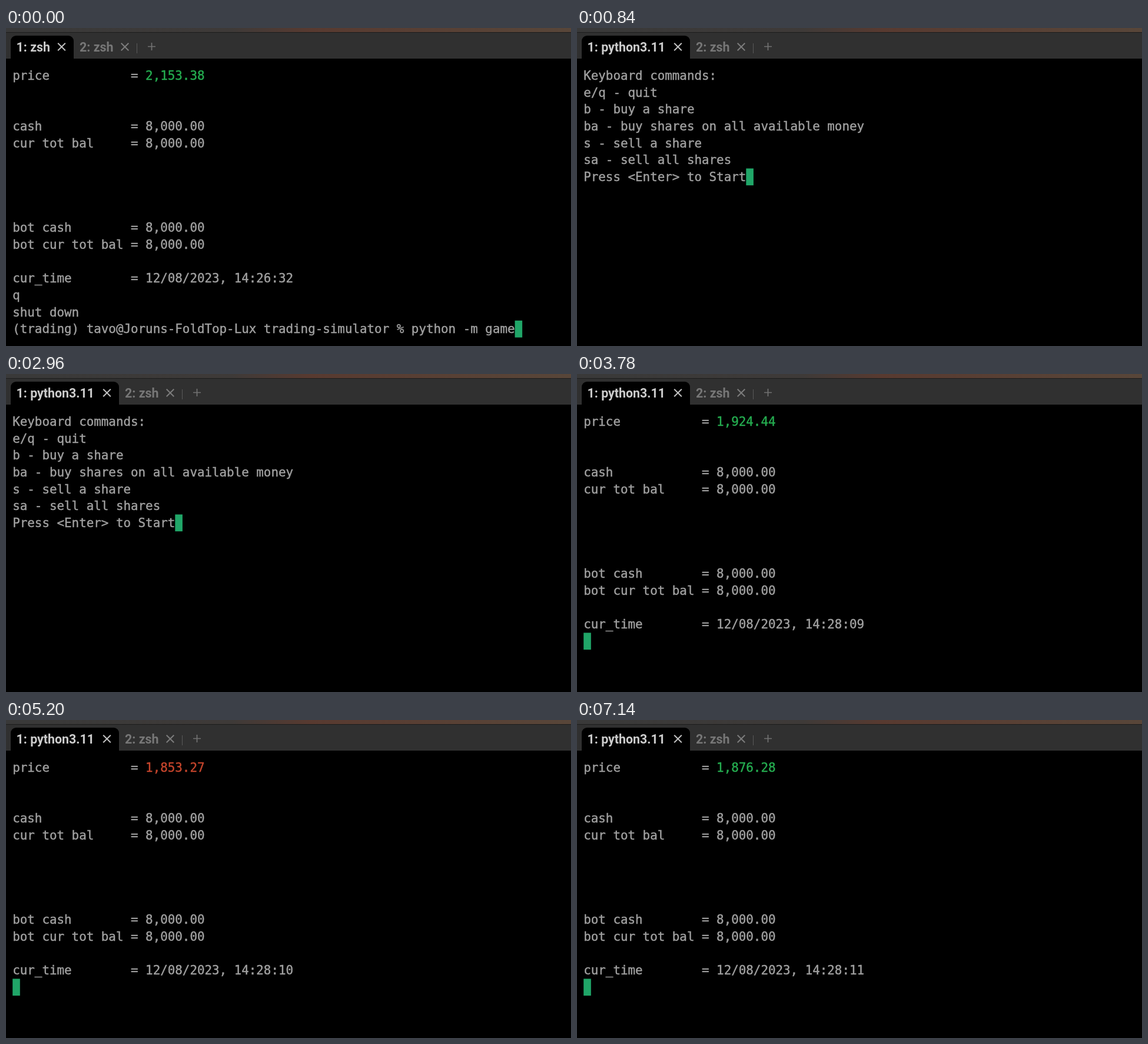
Animation, 960 px wide and 540 px high, one loop 8 s. Source, as an HTML page with a canvas:

```html
<!DOCTYPE html>
<html lang="en">
<head>
<meta charset="utf-8">
<title>Trading simulator terminal</title>
<style>
  html, body { margin: 0; width: 100%; height: 100%; overflow: hidden; background: #000; }
  canvas { display: block; width: 960px; height: 540px; }
</style>
</head>
<body>
<canvas id="stage" width="960" height="540"></canvas>
<script>
const ctx = document.getElementById('stage').getContext('2d');
const LOOP = 8000;
const LEFT = 11.2, COLUMN = 12.55, BASELINE = 87.8, ROW = 28.7;
const TEXT = '#a0a0a0', GREEN = '#25ad50', RED = '#c5452c', CURSOR = '#20a668';
const MONO = '20.85px "DejaVu Sans Mono", monospace';
const TAB_FONT = 'bold 21.4px Roboto, sans-serif';

const field = (label, value) => label.padEnd(16) + '= ' + value;

const dashboard = (price, time) => [
  field('price', price), '', '',
  field('cash', '8,000.00'),
  field('cur tot bal', '8,000.00'), '', '', '', '',
  field('bot cash', '8,000.00'),
  field('bot cur tot bal', '8,000.00'), '',
  field('cur_time', '12/08/2023, ' + time)
];

const shell = [
  ...dashboard('2,153.38', '14:26:32'), 'q', 'shut down',
  '(trading) tavo@Joruns-FoldTop-Lux trading-simulator % python -m game'
];

const help = [
  'Keyboard commands:',
  'e/q - quit',
  'b - buy a share',
  'ba - buy shares on all available money',
  's - sell a share',
  'sa - sell all shares',
  'Press <Enter> to Start'
];

// cursor is [column, row]
const scenes = [
  { at: 0, lines: shell, cursor: [68, 15], priceColor: GREEN },
  { at: 260, lines: shell, cursor: [0, 16], priceColor: GREEN },
  { at: 820, lines: help, cursor: [22, 6] },
  { at: 3780, lines: dashboard('1,924.44', '14:28:09'), cursor: [0, 13], priceColor: GREEN },
  { at: 5200, lines: dashboard('1,853.27', '14:28:10'), cursor: [0, 13], priceColor: RED },
  { at: 6600, lines: dashboard('1,876.28', '14:28:11'), cursor: [0, 13], priceColor: GREEN }
];

function rect(color, x, y, w, h) {
  ctx.fillStyle = color;
  ctx.fillRect(x, y, w, h);
}

function text(string, x, y, color, font) {
  ctx.font = font;
  ctx.fillStyle = color;
  ctx.fillText(string, x, y);
}

// A hairline outline gives the terminal face its medium weight.
function monoText(string, x, y, color) {
  text(string, x, y, color, MONO);
  ctx.strokeStyle = color;
  ctx.lineWidth = 0.45;
  ctx.strokeText(string, x, y);
}

function stroke(color, width, ...segments) {
  ctx.strokeStyle = color;
  ctx.lineWidth = width;
  ctx.beginPath();
  for (const [x1, y1, x2, y2] of segments) {
    ctx.moveTo(x1, y1);
    ctx.lineTo(x2, y2);
  }
  ctx.stroke();
}

function closeMark(x, color) {
  const r = 6.3, y = 32;
  stroke(color, 2, [x - r, y - r, x + r, y + r], [x - r, y + r, x + r, y - r]);
}

function drawTopStrip() {
  const glow = ctx.createLinearGradient(0, 0, 960, 0);
  glow.addColorStop(0, '#393939');
  glow.addColorStop(0.4, '#3e3a38');
  glow.addColorStop(0.54, '#583a30');
  glow.addColorStop(1, '#584639');
  rect(glow, 0, 0, 960, 7);
  rect('#1c1c1c', 0, 7, 960, 1);
}

function drawTabs(title, right) {
  rect('#303030', 0, 8, 960, 44);
  ctx.fillStyle = '#000';
  ctx.beginPath();
  ctx.roundRect(8, 13, right - 8, 40, [9, 9, 0, 0]);
  ctx.fill();

  text('1: ' + title, 17.5, 40, '#cccccc', TAB_FONT);
  closeMark(right - 20.5, '#c2c2c2');
  text('2: zsh', right + 10, 40, '#777777', TAB_FONT);
  closeMark(right + 87, '#7c7c7c');

  const plus = right + 132.5;
  stroke('#5a5a5a', 1, [right + 107.5, 26, right + 107.5, 43]);
  stroke('#727272', 1.7, [plus - 6.5, 31.5, plus + 6.5, 31.5], [plus, 25, plus, 38]);
}

function drawTerminal({ lines, cursor, priceColor }) {
  lines.forEach((line, row) => {
    const y = BASELINE + row * ROW;
    const split = priceColor && row === 0 ? 18 : line.length;
    monoText(line.slice(0, split), LEFT, y, TEXT);
    monoText(line.slice(split), LEFT + split * COLUMN, y, priceColor || TEXT);
  });
  const [column, row] = cursor;
  rect(CURSOR, LEFT + column * COLUMN, BASELINE - 21.5 + row * ROW, 12.6, ROW);
}

function draw(now) {
  const time = now % LOOP;
  const scene = scenes.findLast(({ at }) => at <= time);
  rect('#000', 0, 0, 960, 540);
  drawTopStrip();
  if (scene.lines === shell) drawTabs('zsh', 115);
  else drawTabs('python3.11', 192);
  drawTerminal(scene);
}

const started = performance.now();
function tick() {
  draw(performance.now() - started);
  requestAnimationFrame(tick);
}
tick();
</script>
</body>
</html>
```
